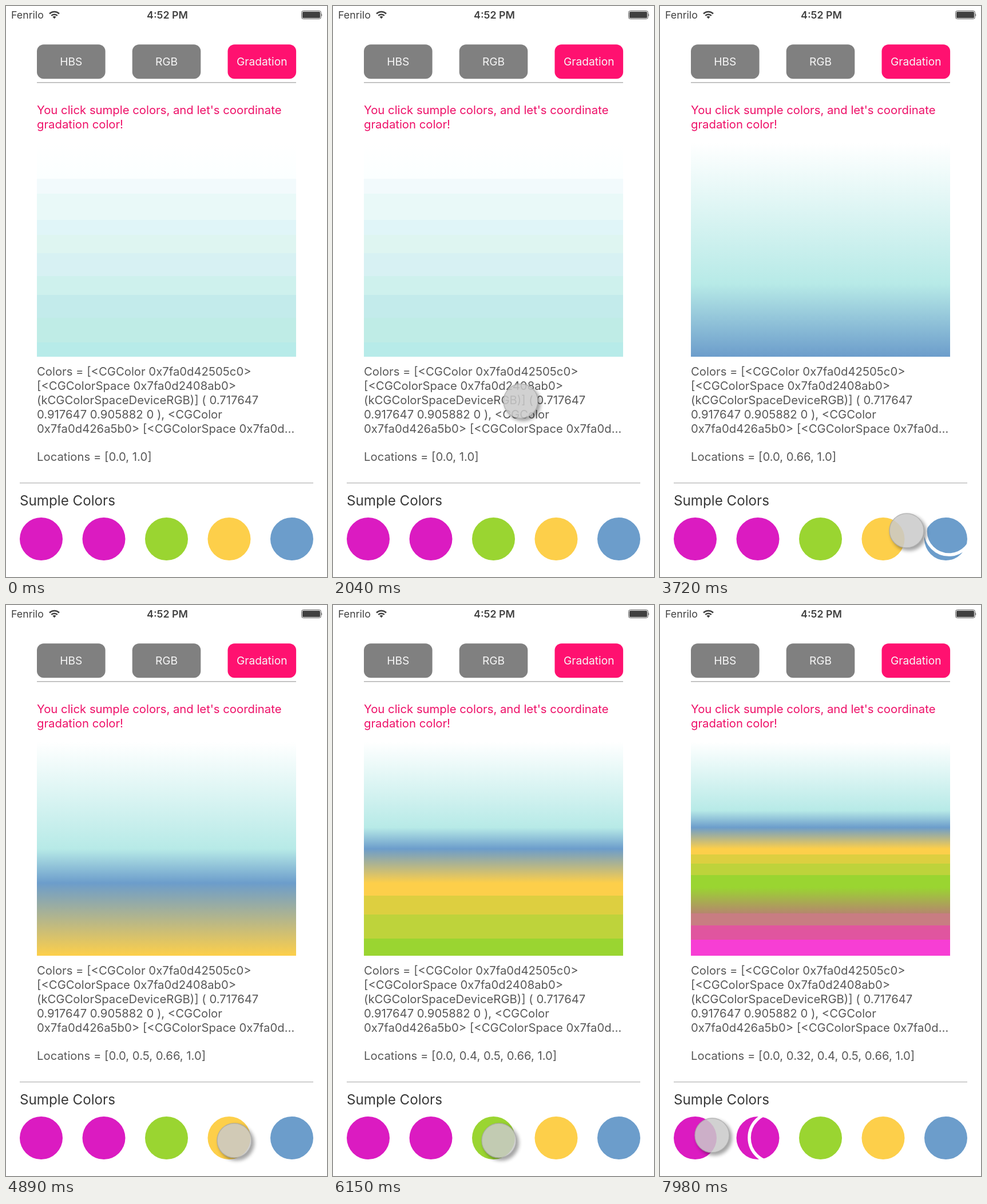
These frames come from a looping animation (561 by 998 pixels, 8 s). An HTML page:

```html
<!DOCTYPE html>
<html lang="en">
<head>
<meta charset="utf-8">
<title>Gradation color picker</title>
<style>
  html, body { margin: 0; width: 100%; height: 100%; overflow: hidden; background: #fff; }
  svg { display: block; width: 100vw; height: 100vh; font-family: Inter, Roboto, sans-serif; }
  .status { font-size: 17.8px; fill: #404040; }
  .button { font-size: 19.2px; fill: #f6f6f6; text-anchor: middle; }
  .lead { font-size: 20.3px; fill: #ee1068; }
  .body { font-size: 20.3px; fill: #585858; }
</style>
</head>
<body>
<svg viewBox="0 0 561 998" preserveAspectRatio="none">
  <defs>
    <linearGradient id="gradation" x1="0" y1="0" x2="0" y2="1"></linearGradient>
    <clipPath id="swatchClip"><circle id="clipCircle" cy="931.5" r="38.5"/></clipPath>
    <filter id="blur" x="-30%" y="-30%" width="160%" height="160%"><feGaussianBlur stdDeviation="3"/></filter>
    <mask id="outside" maskUnits="userSpaceOnUse" x="-50" y="-50" width="100" height="100">
      <rect x="-50" y="-50" width="100" height="100" fill="#fff"/><circle r="30" fill="#000"/>
    </mask>
  </defs>

  <g class="status">
    <text x="9" y="22">Fenrilo</text>
    <text x="282" y="22" text-anchor="middle" font-weight="600">4:52 PM</text>
    <g fill="none" stroke="#404040" stroke-width="2.5">
      <path d="M76 13.5a12.2 12.2 0 0 1 17 0M79.2 16.8a7.6 7.6 0 0 1 10.6 0"/>
    </g>
    <path d="M84.5 22.3l-3-3.2a4.3 4.3 0 0 1 6 0z"/>
    <rect x="516.5" y="8.5" width="34" height="14" rx="3" fill="none" stroke="#555"/>
    <rect x="518" y="10" width="31" height="11" rx="1.5"/>
    <path d="M551.5 13q1.8 2.5 0 5z"/>
  </g>

  <g id="buttons"></g>
  <path d="M54 133.7H507" stroke="#b2b2b2" stroke-width="1.5"/>
  <path d="M24 833.7H537" stroke="#c6c6c6" stroke-width="1.8"/>

  <g class="lead">
    <text x="54" y="189">You click sumple colors, and let's coordinate</text>
    <text x="54" y="213.7">gradation color!</text>
  </g>

  <rect x="54" y="239.5" width="453" height="373.5" fill="url(#gradation)"/>

  <g class="body">
    <text x="54" y="646">Colors = [&lt;CGColor 0x7fa0d42505c0&gt;</text>
    <text x="54" y="671">[&lt;CGColorSpace 0x7fa0d2408ab0&gt;</text>
    <text x="54" y="696">(kCGColorSpaceDeviceRGB)] ( 0.717647</text>
    <text x="54" y="721">0.917647 0.905882 0 ), &lt;CGColor</text>
    <text x="54" y="745.5">0x7fa0d426a5b0&gt; [&lt;CGColorSpace 0x7fa0d…</text>
    <text x="54" y="795" id="locations"></text>
  </g>

  <text x="24" y="872.5" font-size="24.2" fill="#383838">Sumple Colors</text>
  <g id="swatches"></g>
  <g clip-path="url(#swatchClip)">
    <circle id="ring" fill="none" stroke="#fff" stroke-width="5.5"/>
  </g>

  <g id="cursor">
    <circle cx="4" cy="4" r="31" fill="#000" opacity=".36" filter="url(#blur)" mask="url(#outside)"/>
    <circle r="30" fill="#c9c9c9" fill-opacity=".85" stroke="#a8a8a8" stroke-opacity=".75" stroke-width="1.5"/>
  </g>
</svg>

<script>
const LOOP = 8000, STEP = 30, RING_LIFE = 1140;
const $ = id => document.getElementById(id);

const TEAL = '#b7eae7', BLUE = '#6c9dcb', YELLOW = '#fdcf4a', GREEN = '#9ad531', MAGENTA = '#db1bc1';

$('buttons').innerHTML = [['HBS', 54, '#808080'], ['RGB', 220.7, '#808080'], ['Gradation', 387.5, '#ff1170']]
  .map(([label, x, fill]) =>
    `<rect x="${x}" y="67.3" width="119.6" height="60" rx="12" fill="${fill}"/>
     <text class="button" x="${x + 59.8}" y="104">${label}</text>`).join('');

const swatchX = i => 61.5 + 109.5 * i;
$('swatches').innerHTML = [MAGENTA, MAGENTA, GREEN, YELLOW, BLUE]
  .map((fill, i) => `<circle cx="${swatchX(i)}" cy="931.5" r="37.5" fill="${fill}"/>`).join('');

// A ramp is a list of [fraction, color]; a repeated fraction makes a hard edge.
const smooth = (from, to) => [[0, from], [1, to]];
const bands = (edges, colors) =>
  colors.flatMap((c, i) => [[edges[i - 1] ?? 0, c], [edges[i] ?? 1, c]]);

const bandedTeal = [[0, '#fff'], [.168, '#fbffff'],
  ...bands([.238, .361, .43, .516, .623, .711, .818, .933],
    ['#f2fafc', '#e9f9f8', '#e0f5f8', '#def5f1', '#d7f1f3', '#cef1ed', '#c3ebeb', '#bfece6', '#b7ebe9'])
    .map(([f, c]) => [Math.max(f, .168), c])];
const toTeal = smooth('#fff', TEAL);
const toBlue = smooth(TEAL, BLUE);
const toYellow = smooth(BLUE, YELLOW);
const toGreen = bands([.17, .43, .76], [YELLOW, '#ddcf40', '#bed33b', GREEN]);
const toMagenta = [[0, GREEN], [.06, GREEN], [.42, '#b5876d'],
  ...bands([.58, .78], ['#c87d82', '#e0559f', '#f73ed4']).map(([f, c]) => [Math.max(f, .42), c])];

const states = [
  { at: 0, locations: [0, 1], ramps: [bandedTeal] },
  { at: 2970, locations: [0, .66, 1], ramps: [toTeal, toBlue], tap: [505, 918], swatch: 4 },
  { at: 4890, locations: [0, .5, .66, 1], ramps: [toTeal, toBlue, toYellow], tap: [399, 936], swatch: 3 },
  { at: 6150, locations: [0, .4, .5, .66, 1], ramps: [toTeal, toBlue, toYellow, toGreen], tap: [290, 936], swatch: 2 },
  { at: 6990, locations: [0, .32, .4, .5, .66, 1],
    ramps: [toTeal, toBlue, toYellow, toGreen, toMagenta], tap: [199.5, 931], swatch: 1 }
];

// Cursor stops: time, x, y
const path = [
  [750, 530, 814], [840, 417, 771], [1020, 417, 771], [1380, 320.5, 735], [1500, 322, 693],
  [1740, 322, 693], [1860, 313, 676], [2010, 326, 688], [2490, 507, 918], [3300, 507, 918],
  [3690, 431, 917], [3780, 431, 917], [4110, 430, 932], [4470, 430, 932], [4650, 399, 936],
  [5430, 399, 936], [5670, 350, 929], [5970, 290, 936], [6480, 290, 936], [6930, 200, 931],
  [7590, 200, 931], [7770, 207, 930], [7980, 91, 927]
];

function cursorAt(t) {
  const next = path.findIndex(p => p[0] > t);
  if (next < 0) return path.at(-1).slice(1);
  const [t0, x0, y0] = path[next - 1], [t1, x1, y1] = path[next];
  const u = (t - t0) / (t1 - t0), e = u * u * (3 - 2 * u);
  return [x0 + (x1 - x0) * e, y0 + (y1 - y0) * e];
}

let shown;
function showState(state) {
  if (state === shown) return;
  shown = state;
  const { locations, ramps } = state;
  $('gradation').innerHTML = ramps.flatMap((ramp, i) => ramp.map(([f, color]) =>
    `<stop offset="${locations[i] + (locations[i + 1] - locations[i]) * f}" stop-color="${color}"/>`)).join('');
  const label = v => Number.isInteger(v) ? v.toFixed(1) : v;
  $('locations').textContent = `Locations = [${locations.map(label).join(', ')}]`;
}

function showRing({ at, tap, swatch }, t) {
  const age = t - at;
  const visible = tap && age > 0 && age < RING_LIFE;
  $('ring').style.display = visible ? '' : 'none';
  if (!visible) return;
  $('clipCircle').setAttribute('cx', swatchX(swatch));
  $('ring').setAttribute('cx', tap[0]);
  $('ring').setAttribute('cy', tap[1]);
  $('ring').setAttribute('r', 43.7 * (1 - (1 - age / RING_LIFE) ** 2.6));
  $('ring').setAttribute('opacity', Math.min(1, (RING_LIFE - age) / 120));
}

function draw(now) {
  const t = Math.floor(now % LOOP / STEP) * STEP;
  const state = states.findLast(s => s.at <= t);
  showState(state);
  showRing(state, t);
  $('cursor').style.display = t < path[0][0] ? 'none' : '';
  if (t >= path[0][0]) $('cursor').setAttribute('transform', `translate(${cursorAt(t)})`);
}

const start = performance.now();
function tick() {
  draw(performance.now() - start);
  requestAnimationFrame(tick);
}
tick();
</script>
</body>
</html>
```
